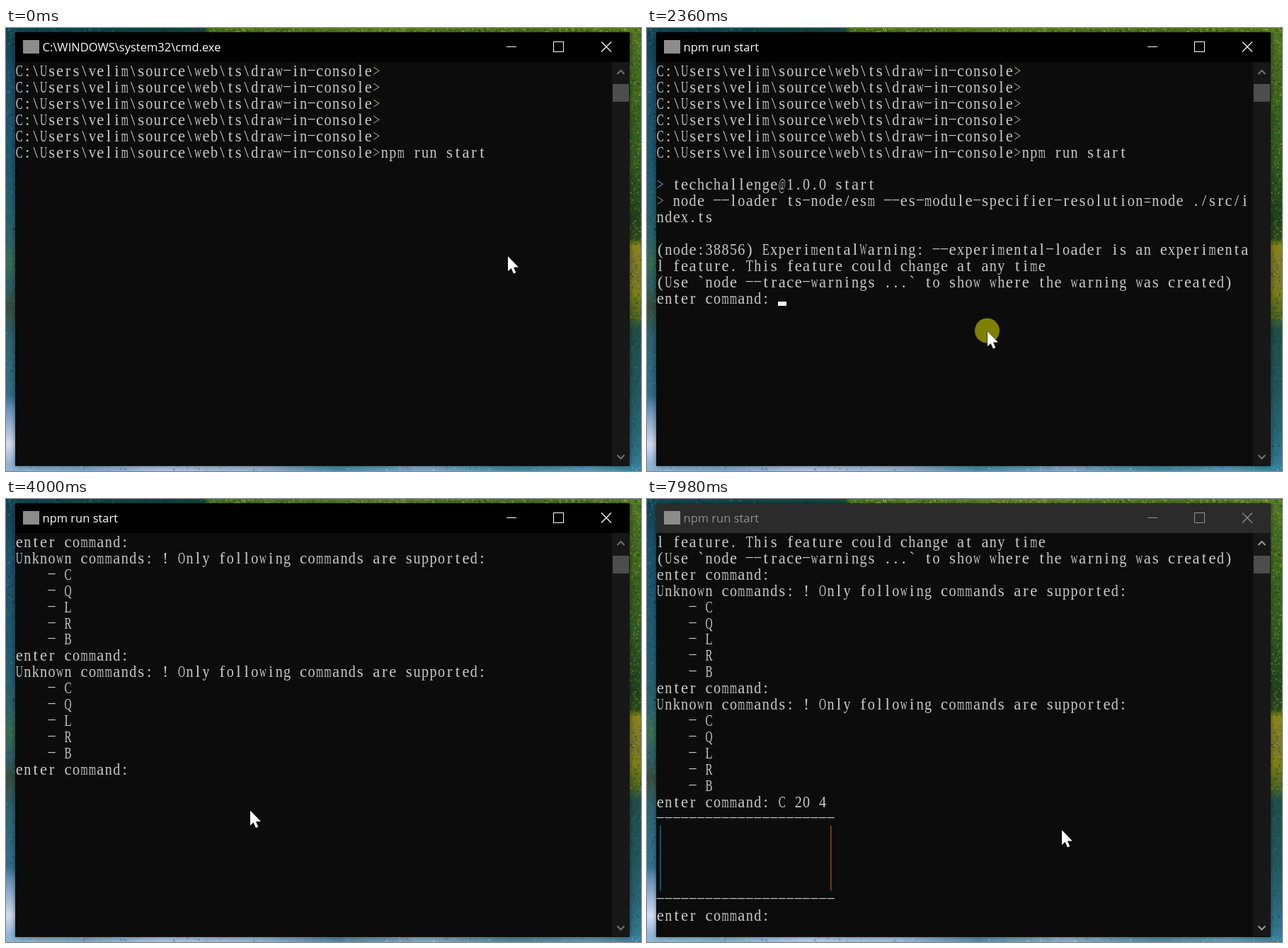
Write an HTML page with a canvas that moves like this. It is 897x625 px and loops after 8000 ms.

```html
<!DOCTYPE html>
<html lang="en">
<head>
<meta charset="utf-8">
<title>Console session</title>
<style>
html, body { margin: 0; width: 100%; height: 100%; overflow: hidden; background: #0c0c0c; }
canvas { display: block; }
</style>
</head>
<body>
<canvas id="stage" width="897" height="625"></canvas>
<script>
const W = 897, H = 625, LOOP = 8000;
const CELL_W = 11.467, CELL_H = 22.933, LEFT = 13, TOP = 48, ROWS = 24;
const GLYPH_W = CELL_W - 1.4;
const TEXT_FONT = '23px "Liberation Serif", serif';
const TITLE_FONT = '16.5px "Open Sans", "Noto Sans", sans-serif';
const ctx = document.getElementById('stage').getContext('2d');

// ---- console text ----
const PROMPT = 'C:\\Users\\velim\\source\\web\\ts\\draw-in-console>';
const ASK = 'enter command: ';
const TYPED = 'C 20 4';
const HELP = ['Unknown commands: ! Only following commands are supported:',
  ...[...'CQLRB'].map(c => '    - ' + c)];
const EDGE = '-'.repeat(22);
const SIDE = '|' + ' '.repeat(20) + '|';
const BOX = [EDGE, SIDE, SIDE, SIDE, SIDE, EDGE];
const START = [...Array(5).fill(PROMPT), PROMPT + 'npm run start'];
const NPM = ['', '> techchallenge@1.0.0 start',
  '> node --loader ts-node/esm --es-module-specifier-resolution=node ./src/i', 'ndex.ts', ''];
const WARNING = [
  '(node:38856) ExperimentalWarning: --experimental-loader is an experimenta',
  'l feature. This feature could change at any time',
  '(Use `node --trace-warnings ...` to show where the warning was created)'];

// ---- timeline: [start, ...values], held until the next entry ----
const KEYS = [4330, 4480, 4680, 4840, 5000, 5150];
const ENTER = 5300;
const SCROLL = [[0, 0], [2890, 5], [3370, 8], [3590, 11], [3800, 14], [4330, 5], [ENTER, 12]];
const FOCUS = [[0, true], [70, false], [2360, true], [6580, false]];
const CARET = [[0, false], [1260, true], [3510, false], [4330, true], [6100, false]];
const MOUSE = [[0, 709, 322], [70], [1530, 626, 335], [1610, 481, 428], [4000, 345, 439.5],
  [4330], [5360, 470, 428], [5430, 613, 402], [5500, 759, 362], [5570],
  [7840, 870, 435], [7910, 722, 456], [7980, 586, 467]];

function held(list, t) {
  let cur = list[0];
  for (const step of list) if (step[0] <= t) cur = step;
  return cur;
}

function logAt(t) {
  const log = [...START];
  if (t >= 1130) log.push(...NPM);
  if (t >= 1260) log.push(...WARNING);
  if (t >= 1260 && t < 2010) log.push('');
  if (t >= 2010) log.push(ASK);
  if (t >= 2690) log.push(...HELP, ASK);
  if (t >= 2890) log.push(...HELP, ASK + TYPED.slice(0, KEYS.filter(k => k <= t).length));
  if (t >= ENTER) log.push(...BOX, ASK);
  return log;
}

function mouseAt(t) {
  if (t >= 3160 && t < 4000) {
    const k = Math.min(1, (Math.floor((t - 3160) / 71) + 1) / 11);
    return [481 - 140 * k, 428 + 12 * k];
  }
  return held(MOUSE, t).slice(1);
}

// ---- wallpaper ----
let seed = 7;
function rnd() {
  seed = (seed * 16807) % 2147483647;
  return seed / 2147483647;
}

function makeWallpaper() {
  const c = document.createElement('canvas');
  c.width = W; c.height = H;
  const g = c.getContext('2d');
  const band = (x, y, w, h, stops) => {
    const grad = w > h ? g.createLinearGradient(x, 0, x + w, 0) : g.createLinearGradient(0, y, 0, y + h);
    stops.forEach(([p, col]) => grad.addColorStop(p, col));
    g.fillStyle = grad;
    g.fillRect(x, y, w, h);
  };
  const flecks = (n, x, y, w, h, cols) => {
    for (let i = 0; i < n; i++) {
      g.fillStyle = cols[Math.floor(rnd() * cols.length)];
      g.globalAlpha = 0.2 + 0.35 * rnd();
      g.fillRect(x + rnd() * w, y + rnd() * h, 1 + rnd() * 2, 1 + rnd() * 2);
    }
    g.globalAlpha = 1;
  };
  band(0, 0, 14, H, [[0, '#123f4c'], [.1, '#1b5069'], [.32, '#205872'], [.47, '#2a6370'],
    [.53, '#3a6d50'], [.58, '#2d5f66'], [.63, '#374f3f'], [.7, '#2c6274'], [.83, '#31708a'],
    [.86, '#6a93bb'], [.94, '#d3ddf4'], [1, '#7ba6cf']]);
  band(880, 0, 17, H, [[0, '#4c7426'], [.15, '#3c661f'], [.3, '#2f5a22'], [.43, '#1f421e'],
    [.475, '#294a1c'], [.49, '#8a8418'], [.55, '#78772f'], [.6, '#7d7c18'], [.65, '#4a6420'],
    [.68, '#214e48'], [.82, '#22585c'], [.92, '#2a6878'], [1, '#367f9a']]);
  band(0, 0, W, 7, [[0, '#144a58'], [.31, '#17443f'], [.32, '#4c7a22'], [.6, '#5f8528'],
    [.8, '#4e7820'], [1, '#567f24']]);
  band(0, 616, W, 9, [[0, '#8fb8d8'], [.12, '#7fa9cd'], [.25, '#b3c8e6'], [.4, '#9ab8d8'],
    [.52, '#4f8ba4'], [.66, '#86aed0'], [.8, '#4a8aa4'], [.92, '#5f9abb'], [1, '#367f9a']]);
  flecks(260, 0, 0, 13, 520, ['#0b2f3c', '#3f86a0', '#3f7a58']);
  flecks(500, 881, 0, 16, 410, ['#142c12', '#7ea23a', '#a59c22', '#244f20']);
  flecks(120, 881, 410, 16, 200, ['#123c40', '#3c7a74']);
  flecks(420, 285, 0, 612, 6, ['#23400f', '#a8c24c', '#cfd86c']);
  flecks(90, 0, 0, 285, 6, ['#0a3038', '#2f7a80']);
  flecks(120, 0, 618, W, 7, ['#d4e0f2', '#3d7f9c']);
  return c;
}
const wallpaper = makeWallpaper();

// ---- drawing helpers ----
function rect(x, y, w, h, color) {
  ctx.fillStyle = color;
  ctx.fillRect(x, y, w, h);
}

function line(points, color, width) {
  ctx.beginPath();
  points.forEach(([x, y]) => ctx.lineTo(x, y));
  ctx.strokeStyle = color;
  ctx.lineWidth = width;
  ctx.stroke();
}

const widths = {};
function glyph(ch, col, row) {
  const x = LEFT + col * CELL_W, y = TOP + row * CELL_H;
  if (ch === ' ') return;
  if (ch === '|') {
    rect(x + 5.2, y, 1.5, CELL_H, col ? '#93482a' : '#1b6a90');
    return;
  }
  let base = y + 19.9;
  if (ch === '-') { ch = '\u2013'; base -= 3; }
  if (!widths[ch]) widths[ch] = ctx.measureText(ch).width;
  ctx.fillStyle = ch !== '>' ? '#c8c8c8' : col ? '#aaa79c' : row % 2 ? '#7d97a8' : '#b0824e';
  ctx.save();
  ctx.translate(x + CELL_W / 2, base);
  ctx.scale(Math.min(1, GLYPH_W / widths[ch]), 1);
  ctx.fillText(ch, 0, 0);
  ctx.restore();
}

function drawFrame(focus, title) {
  ctx.drawImage(wallpaper, 0, 0);
  ctx.save();
  ctx.shadowColor = 'rgba(0,0,0,.5)';
  ctx.shadowBlur = focus ? 8 : 5;
  rect(13, 6, 868, 612, '#0c0c0c');
  ctx.restore();
  rect(13, 6, 868, 42, focus ? '#000' : '#2b2b2b');
  rect(24, 17, 23, 19, '#8c8c8c');

  ctx.font = TITLE_FONT;
  ctx.textAlign = 'left';
  ctx.fillStyle = focus ? '#fff' : '#8f8f8f';
  ctx.fillText(title, 51.5, 33);

  const ink = focus ? '#fff' : '#8f8f8f';
  line([[707, 26.5], [721, 26.5]], ink, 1);
  ctx.strokeRect(773.5, 19.5, 14, 14);
  line([[841, 19.5], [855, 33.5]], ink, 1.2);
  line([[855, 19.5], [841, 33.5]], ink, 1.2);
}

function drawScrollbar(focus, top) {
  const ink = focus ? '#747474' : '#9a9a9a';
  rect(856, 48, 25, 569, '#171717');
  rect(857, top ? 80 : 79, 23, 25, '#4d4d4d');
  line([[863.5, 65], [868.5, 60], [873.5, 65]], ink, 2);
  line([[863.5, 602.5], [868.5, 607.5], [873.5, 602.5]], ink, 2);
}

function drawMouse(x, y, pressed) {
  if (pressed) {
    ctx.beginPath();
    ctx.arc(x - 0.5, y - 1, 17.5, 0, 7);
    ctx.fillStyle = '#808000';
    ctx.fill();
  }
  ctx.beginPath();
  [[0, 0], [0, 21], [4.6, 17], [8, 24.5], [11.3, 23], [8, 15.6], [15, 15.6]]
    .forEach(([px, py]) => ctx.lineTo(x + px, y + py));
  ctx.closePath();
  ctx.strokeStyle = '#000';
  ctx.lineWidth = 1;
  ctx.stroke();
  ctx.fillStyle = '#fff';
  ctx.fill();
}

function draw(t) {
  const focus = held(FOCUS, t)[1], top = held(SCROLL, t)[1];
  const log = logAt(t);
  drawFrame(focus, t < 1060 ? 'C:\\WINDOWS\\system32\\cmd.exe' : 'npm run start');
  drawScrollbar(focus, top);

  ctx.font = TEXT_FONT;
  ctx.textAlign = 'center';
  log.slice(top, top + ROWS).forEach((text, row) =>
    [...text].forEach((ch, col) => glyph(ch, col, row)));

  if (held(CARET, t)[1]) {
    const last = log.length - 1;
    rect(LEFT + log[last].length * CELL_W, Math.round(TOP + (last - top + 1) * CELL_H) - 6, 12, 6, '#f2f2f2');
  }
  const [x, y] = mouseAt(t);
  if (x !== undefined) drawMouse(x, y, t >= 2360 && t < 2490);
}

const begin = performance.now();
function tick() {
  draw((performance.now() - begin) % LOOP);
  requestAnimationFrame(tick);
}
tick();
</script>
</body>
</html>
```
